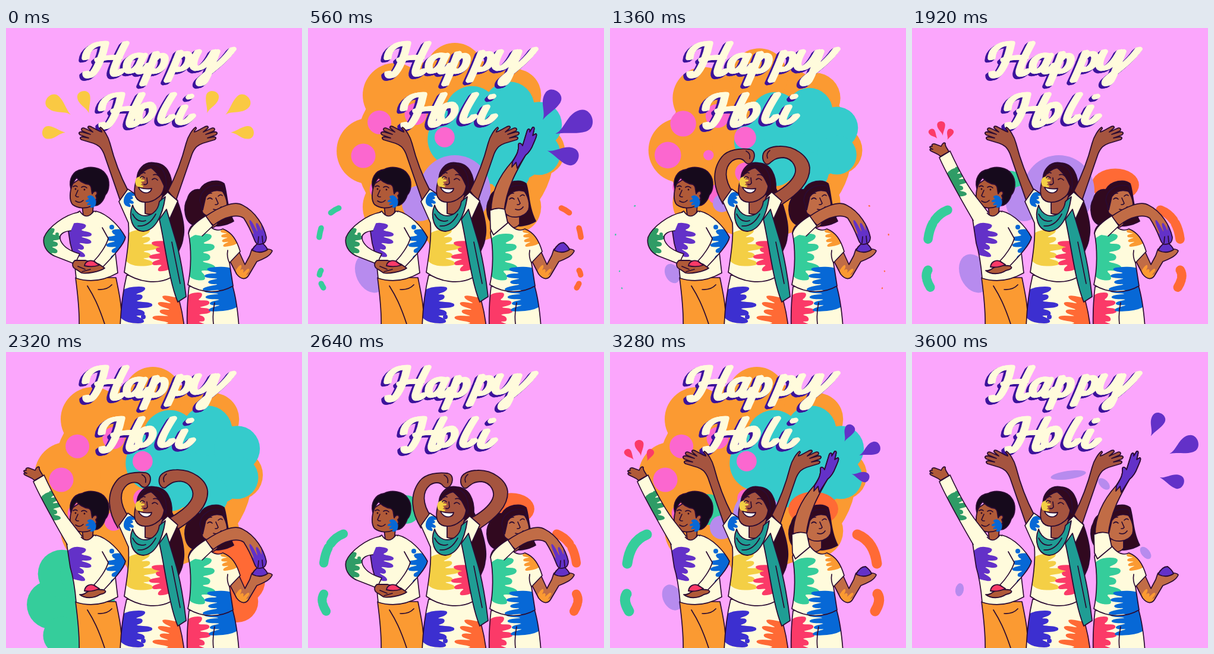
An HTML page for the animation above (3.68 s loop, 498 px wide and 498 px high).

```html
<!DOCTYPE html>
<html lang="en">
<head>
<meta charset="utf-8">
<title>Happy Holi</title>
<style>
html, body { margin: 0; width: 100%; height: 100%; overflow: hidden; background: #fba6fc; }
svg { display: block; width: 100vw; height: 100vh; }
.o { stroke: #2b0b32; stroke-width: 1.8; stroke-linejoin: round; stroke-linecap: round; }
.l { fill: none; stroke: #2b0b32; stroke-width: 1.7; stroke-linecap: round; stroke-linejoin: round; }
.t { fill: none; stroke-width: 7.5; stroke-linecap: round; stroke-linejoin: round; }
</style>
</head>
<body>
<svg id="stage" viewBox="0 0 498 498" role="img" aria-label="Happy Holi"></svg>
<script>
const LOOP = 3680, STEP = 80;
const C = {
  cream: '#fffbdc', hair: '#31091f', black: '#160a1c', skin: '#a5543f', brown: '#b05a38', tan: '#c16c46',
  orange: '#fb9a32', pink: '#fb67cf', teal: '#35cbcc', green: '#35cd9b', fern: '#2f9c66', red: '#ff6a35',
  lilac: '#b78bee', yellow: '#fac943', purple: '#6331c8', rose: '#fb3a68', blue: '#0768d6',
  indigo: '#3c2fd0', scarf: '#1f9d94', ink: '#3c149b', gold: '#f4cf45'
};

// ---------- helpers ----------
const mix = (a, b, k) => a + (b - a) * k;
const unit = v => Math.max(0, Math.min(1, v));
const easeOut = k => 1 - (1 - k) ** 2;
const range = n => [...Array(n).keys()];
const shape = (d, fill) => `<path class="o" d="${d}" fill="${fill}"/>`;
const line = d => `<path class="l" d="${d}"/>`;
const ball = (x, y, r, fill, ry = r, turn = 0) =>
  `<ellipse cx="${x}" cy="${y}" rx="${r}" ry="${ry}" fill="${fill}" transform="rotate(${turn} ${x} ${y})"/>`;
const mirror = s => `<g transform="translate(478 0) scale(-1 1)">${s}</g>`;

// Closed curve through the middles of a polygon's sides.
function soft(pts) {
  const mid = (p, q) => [(p[0] + q[0]) / 2, (p[1] + q[1]) / 2].map(v => v.toFixed(1));
  const steps = pts.map((p, i) => `Q${p.map(v => v.toFixed(1))} ${mid(p, pts[(i + 1) % pts.length])}`);
  return 'M' + mid(pts[pts.length - 1], pts[0]) + steps.join('') + 'Z';
}

// Paint mark: fingers of uneven length fanning out from a base line.
function smear(x, y, len, wide, turn, fill, n = 5) {
  const pts = [[0, -wide / 2]];
  range(n).forEach(i => {
    const c = (i + .5) / n - .5, h = .36 * wide / n;
    const tip = len * (.72 + .42 * Math.abs(Math.sin(i * 1.9 + len))) * (1 - 1.2 * c * c);
    pts.push([tip, c * wide * 1.2 - h], [tip, c * wide * 1.2 + h]);
    if (i < n - 1) pts.push([len * .45, (c + .5 / n) * wide]);
  });
  pts.push([0, wide / 2], [-len * .3, 0]);
  return `<path d="${soft(pts)}" fill="${fill}" transform="translate(${x} ${y}) rotate(${turn})"/>`;
}

let clips = 0;
function cloth(d, fill, paint = '') {
  const id = 'clip' + clips++;
  return `<clipPath id="${id}"><path d="${d}"/></clipPath><path d="${d}" fill="${fill}"/>
    <g clip-path="url(#${id})">${paint}</g>${line(d)}`;
}

// ---------- lettering: thin strokes swept along a broad nib ----------
const bigH = 'M134 50C135 34 150 25 167 26C163 46 155 65 148 74C142 83 135 82 135 76' +
  'M201 26C191 45 183 62 181 72C180 80 187 80 194 72M155 53Q174 48 190 50';
const happy = 'M229 47C217 42 203 52 203 65C203 77 215 75 225 61M232 46C226 58 221 67 223 72C226 77 233 72 240 62' +
  'M252 43C246 60 238 78 231 94M247 56C255 43 269 43 267 55C265 68 253 77 244 71' +
  'M292 41C286 57 279 73 272 88M287 53C295 40 310 40 308 52C306 65 294 74 284 68' +
  'M323 40C315 54 312 66 320 68C331 69 343 54 350 40' +
  'M354 40C347 58 341 78 334 89C328 97 322 94 328 86C339 75 364 60 381 36';
const holi = 'M243 129C230 124 219 144 224 155C231 163 248 148 247 136C246 130 242 128 238 131' +
  'M281 112C270 129 262 144 261 152C261 160 270 159 279 149' +
  'M300 133C294 144 288 154 292 158C297 162 306 157 313 148M309 116L310 115';
const nib = [-3, -1, 1, 3].map(x => `<use href="#word" x="${x}" y="${-x * .2}"/>`).join('');
const title = `<defs><g id="word"><path d="${bigH}${happy}${holi}"/><path d="${bigH}" transform="translate(27 86)"/></g></defs>
  <g class="t">${[5, 4, 3, 2, 1].map(k => `<g stroke="${C.ink}" transform="translate(${-k} ${k * .8})">${nib}</g>`).join('')}
  <g stroke="${C.cream}">${nib}</g></g>`;

// ---------- people ----------
const man = `
  ${cloth('M117 420C121 450 124 476 123 504H195C196 470 190 445 185 420Z', C.orange)}
  ${line('M137 434C147 450 155 465 166 498M155 440Q170 441 178 432')}
  ${shape('M128 298L130 316Q139 325 146 309L147 296Z', C.brown)}
  ${cloth('M124 308Q135 325 148 308C162 313 172 318 178 328L188 412Q153 432 118 421C116 397 112 375 108 362L102 322Z', C.cream,
    smear(104, 352, 38, 52, 12, C.purple))}
  ${shape('M112 262C107 275 106 290 112 297C121 304 134 304 143 300L155 284C156 268 148 252 130 250Z', C.brown)}
  ${shape('M109 270C105 254 113 240 128 238C141 231 160 235 167 245C176 256 174 274 167 281C163 294 154 301 147 298C153 292 154 288 151 282C157 277 150 270 145 279C143 272 145 266 139 263C130 262 122 256 119 252C114 256 112 263 109 270Z', C.black)}
  ${smear(148, 290, 13, 20, 160, C.blue, 4)}
  ${line('M113 267q4-3 7 0M127 268q5-3 9 1M121 273l-4 9q2 3 5 2M117 291q7 5 13-1')}
  ${ball(117, 271, 1.4, C.hair)}${ball(132, 272, 1.4, C.hair)}
  ${cloth('M151 308C172 313 192 335 201 352C199 364 181 383 162 403L148 392C157 383 169 366 172 354L162 336', C.cream,
    smear(203, 361, 33, 46, 172, C.blue) + ball(178, 335, 4, C.blue))}
  <g id="manDown">
    ${cloth('M122 310C99 314 71 335 64 352C61 365 68 377 80 383L116 397L124 380C110 376 97 369 92 358C87 347 98 342 109 341', C.cream,
      smear(64, 362, 25, 50, 5, C.fern) + ball(86, 347, 3, C.fern))}
    ${shape('M116 391C110 396 111 403 118 406L127 412C135 414 158 410 166 404L156 397L134 391Z', C.brown)}
    ${shape('M132 400C133 393 140 390 147 392L157 399Q145 403 132 400Z', C.rose)}
    ${line('M121 401l12 5M128 410l14-4')}
  </g>
  <g id="manUp">
    ${cloth('M103 324C84 291 59 248 46 218L64 207C75 231 92 265 110 287L128 310', C.cream,
      smear(63, 262, 29, 46, -10, C.fern) + ball(75, 236, 2.5, C.fern))}
    ${shape('M48 216C43 211 39 211 32 207C28 204 31 203 35 204C28 201 29 199 34 199C32 195 36 194 41 196L49 199C51 194 54 192 56 194C55 199 60 203 62 208Z', C.brown)}
    ${shape('M124 408C132 410 136 402 146 399L163 400C171 402 168 406 158 408C148 415 132 415 124 408Z', C.brown)}
    ${shape('M132 402C133 393 141 390 147 392L157 398Q145 404 132 402Z', C.rose)}
  </g>`;

const armUp = shape('M192 290L165 212C160 200 155 197 147 194L127 188C123 185 125 183 129 183L139 185L125 180C121 177 123 174 128 175L142 179L128 173C125 169 129 167 133 169L146 175L138 168C137 164 142 165 145 167C152 171 157 174 161 175C162 171 155 170 159 167C164 170 172 182 175 194C183 225 193 250 205 273', C.skin);
const woman = `
  ${shape('M221 262C217 237 234 224 250 227C272 228 280 250 279 270C292 295 303 332 298 352C297 367 291 371 288 382L262 330Z', C.hair)}
  <g id="midUp">${armUp}${mirror(armUp)}</g>
  <g id="midHeart">
    ${shape('M190 296C174 270 170 240 188 217C198 204 220 202 235 204C243 206 244 213 242 220C238 230 231 230 227 225C222 218 212 219 205 224C192 235 192 255 207 277', C.skin)}
    ${shape('M289 297C315 280 337 260 336 235C334 215 310 198 285 199C272 199 258 204 257 215C256 225 263 232 268 228C275 222 280 218 292 218C308 220 316 236 310 248C304 260 288 272 273 280', C.skin)}
    ${line('M229 207q8 4 6 13M269 206q-7 5-4 13')}
  </g>
  ${cloth('M203 416C196 445 193 475 192 504H300C297 475 288 440 277 418Z', C.cream,
    smear(195, 466, 45, 58, 0, C.indigo) + smear(302, 484, 50, 52, 190, C.red) + ball(231, 486, 4, C.indigo))}
  ${cloth('M205 271L190 292L206 328C208 355 203 385 199 411C222 428 255 432 277 420L274 350L272 328L289 291L272 276L248 300Z', C.cream,
    smear(204, 372, 48, 58, -5, C.gold) + smear(279, 382, 35, 48, 175, C.rose) + smear(202, 286, 14, 24, 20, C.blue, 4))}
  ${shape('M234 288L234 312Q250 318 258 300L264 280Z', C.skin)}
  ${shape('M224 245C217 258 214 275 218 284C224 296 243 296 256 285C264 280 267 268 266 260C264 244 255 237 245 235Q231 235 224 245Z', C.skin)}
  ${shape('M221 252C222 236 235 228 250 230C264 233 272 248 269 272C264 263 261 248 244 235Q231 238 221 252Z', C.hair)}
  ${smear(220, 259, 12, 17, 0, C.gold, 4)}
  ${shape('M223 268Q234 272 245 270C244 277 236 279 230 276Q225 273 223 268Z', '#fff')}
  ${line('M226 252q3-4 7 0M246 255q5-4 9 1M237 252l1 9q-3 4-6 2M228 245q3-3 6-1M248 247q5-2 9 2')}
  ${shape('M258 322C268 365 274 425 289 461L303 452C300 425 293 380 284 352L270 305Z', C.scarf)}
  ${shape('M213 298C205 318 212 341 231 342C250 341 263 318 268 284Q262 288 258 292C256 309 242 319 228 315Q217 311 213 298Z', C.scarf)}
  ${line('M213 313q8 16 22 11M222 333q18 2 30-20M279 360q8 40 14 70')}`;

const hand = 'C352 212 355 206 354 196C355 192 359 194 361 198L369 172C372 168 374 171 373 175L378 167C381 166 381 169 380 173L378 181L383 178C387 178 382 188 379 195C375 206 371 210 366 214';
const girl = `
  ${cloth('M308 435C305 460 304 480 305 504H392C390 475 386 450 381 433Z', C.cream,
    smear(304, 476, 38, 58, 0, C.rose) + smear(388, 451, 52, 46, 178, C.blue))}
  ${line('M351 462Q347 480 349 498')}
  ${shape('M326 272C335 256 358 254 367 262C372 275 371 302 383 325C370 333 352 335 340 331L318 332C299 328 298 300 305 288C308 276 317 270 326 272Z', C.hair)}
  ${cloth('M375 389L388 414C396 424 404 424 409 415L422 393C431 389 444 385 448 375C445 370 430 372 420 374C418 370 414 370 413 374L410 383L402 398L392 376Z', C.tan,
    smear(392, 420, 20, 24, -50, C.orange, 4))}
  ${shape('M334 308L334 330Q346 342 356 330L356 312Z', C.tan)}
  ${cloth('M330 322C316 328 308 334 307 345C312 370 312 405 306 432C330 447 360 447 382 434L376 395L394 376C388 356 380 344 365 338Q349 346 333 322Z', C.cream,
    smear(307, 384, 43, 74, 3, C.green) + smear(384, 424, 50, 46, 175, C.blue) + smear(388, 350, 27, 28, 170, C.orange, 4))}
  ${line('M376 395Q371 386 373 374')}
  ${shape('M335 277C330 290 327 300 331 311C341 322 364 320 371 306C375 291 366 275 360 270C350 265 339 270 335 277Z', C.tan)}
  ${shape('M326 290C327 272 345 261 365 266L368 276Q347 268 336 284L331 306Z', C.hair)}
  ${line('M339 288q4-4 8 0M357 283q4-4 7-1M353 286l4 9q-2 3-5 2M349 305q8 3 13-4M338 281q4-4 8-3')}
  ${shape('M414 374C418 366 424 361 430 361Q438 367 440 373Q428 381 414 374Z', C.purple)}
  <g id="girlDown">
    ${cloth('M334 318C360 300 385 290 398 298C420 309 434 333 438 352C438 362 432 364 424 364C417 362 418 348 400 320C390 313 369 316 349 332Z', C.tan,
      smear(430, 366, 42, 34, 245, C.purple))}
    ${line('M425 351l-1 11M431 350l1 11')}
    ${cloth('M307 346C309 335 323 324 336 316L348 333L330 350', C.cream)}
  </g>
  <g id="girlUp">
    ${shape(`M308 308C308 272 325 245 344 224${hand}C350 242 334 270 330 308`, C.tan)}
    ${shape(`M344 225${hand}L352 236L350 226L343 234Z`, C.purple)}
    ${cloth('M306 307Q318 301 331 305L336 328L312 348L307 338Z', C.cream)}
  </g>`;

document.getElementById('stage').innerHTML = `
  <rect width="498" height="498" fill="#fba6fc"/><g id="clouds"></g>
  ${title}<g id="bursts"></g>${man}${girl}${woman}`;

// ---------- clouds: a ring of puffs around a core ----------
// Each end of the growth gives x, y, ring rx, ring ry, puff radius, core share.
function cloud(fill, n, from, to, grow, size) {
  const [x, y, rx, ry, r, core] = from.map((v, i) => mix(v, to[i], grow));
  const ring = range(n).map(i => {
    const a = Math.PI + i * 2 * Math.PI / n;
    const lobe = r * (1 - .14 * Math.cos(a - Math.PI / 2 * i));
    return ball(x + rx * Math.cos(a), y + ry * Math.sin(a), lobe * size, fill);
  });
  return ball(x, y, (rx + r / 2) * core * size, fill, (ry + r / 2) * core * size) + ring.join('');
}

function bigClouds(t) {
  const u = (t + 680) % 880;
  const grow = easeOut(unit((u - 120) / 240));
  const size = unit(u / 120) * unit((680 - u) / 160);
  if (!size) return '';
  return cloud(C.orange, 8, [285, 195, 48, 52, 35, 1], [247, 207, 143, 133, 49, 1], grow, size) +
    cloud(C.teal, 7, [306, 220, 22, 22, 13, .6], [322, 187, 74, 56, 41, 1], grow, size) +
    cloud(C.pink, 7, [172, 205, 40, 34, 32, 1], [165, 215, 72, 72, 18, 0], grow, size);
}

// Low side clouds swell, then burst into crescents.
function sideClouds(t) {
  return range(5).map(i => {
    const u = t - 336 - 716 * i;
    if (u < -320 || u >= 320) return '';
    if (u < 0) {
      const k = unit((u + 320) / 160), size = unit(k * 2), grow = easeOut(unit(k * 2 - 1));
      return cloud(C.green, 6, [120, 445, 25, 35, 24, 1], [112, 425, 36, 60, 36, 1], grow, size) +
        cloud(C.red, 6, [350, 405, 22, 32, 32, 1], [380, 385, 18, 40, 38, 1], grow, size);
    }
    const p = u / 320, q = unit((p - .42) / .55), rest = unit(1.9 - 2 * p);
    const crescent = (d, dx, dy) => `<path d="${d}" pathLength="100" fill="none" stroke-linecap="round"
      stroke-width="${mix(17, 2, q)}" stroke-dasharray="${mix(50, 1, q)} ${98 * q}" transform="translate(${dx * q} ${dy * q})"/>`;
    const pair = crescent('M62 307Q34 318 29 356', -20, -8) + crescent('M28 407Q21 418 32 436', -12, 2);
    return `<g stroke="${C.green}">${pair}</g><g stroke="${C.red}">${mirror(pair)}</g>` +
      (p < .6 ? ball(165, 265, 26 * rest, C.green) + ball(342, 264, 42 * rest, C.red, 29 * rest) : '');
  }).join('');
}

function lilac(t) {
  const puffs = [[400, 1480], [1760, 2200], [3040, 3440]].map(([a, b]) => {
    const k = unit((t - a) / 160) * unit((b - t) / 240);
    return k ? ball(247, 274, 60 * k, C.lilac) + ball(188, 295, 30 * k, C.lilac) +
      ball(105, 413, 24 * k, C.lilac, 34 * k, -25) : '';
  });
  const z = 1.3 - (t - 3440) / 530;
  const shards = t < 3440 ? [] : [[263, 207, 30, -8], [323, 222, 12, 45], [80, 400, 11, 100], [393, 338, 12, 50]]
    .map(([x, y, r, turn]) => ball(x, y, r * z, C.lilac, 7 * z, turn));
  return puffs.concat(shards).join('');
}

// ---------- thrown powder: three drops fanning from a hand ----------
function fan(t, starts, fill, x, y, aim, step, near, far, size) {
  return starts.map(a => {
    const p = (t - a) / 480;
    if (p < 0 || p >= 1) return '';
    const z = size * (p < .35 ? mix(.3, 1, p / .35) : unit((1.25 - p) / .58));
    const reach = mix(near, far, easeOut(p));
    return [-1, 0, 1].map(i => {
      const w = z * (i ? .8 : 1);
      return `<path fill="${fill}" transform="translate(${x} ${y}) rotate(${aim + i * step}) translate(${reach * (i ? .9 : 1.1)} 0) scale(${w})"
        d="M-1.5 .3C-.8 .2 -.4 -.75 .5 -.75C1.4 -.75 1.4 .75 .5 .75C-.2 .75 -.7 .4 -1.5 .3Z"/>`;
    }).join('');
  }).join('');
}

function powder(t) {
  const gold = fan(t, [-312, 1440, 2800], C.yellow, 142, 187, 225, 36, 30, 78, 18);
  return gold + mirror(gold) +
    fan(t, [368, 3216], C.purple, 368, 185, 343, 40, 60, 88, 25) +
    fan(t, [1776, 3040], C.rose, 49, 202, 270, 30, 16, 46, 10);
}

// ---------- poses ----------
const $ = id => document.getElementById(id);
const during = (t, spans) => spans.some(([a, b]) => t >= a && t < b);
function pose(on, up, down) {
  $(up).setAttribute('display', on ? 'inline' : 'none');
  $(down).setAttribute('display', on ? 'none' : 'inline');
}

function draw(t) {
  $('clouds').innerHTML = bigClouds(t) + sideClouds(t) + lilac(t);
  $('bursts').innerHTML = powder(t);
  pose(during(t, [[960, 1440], [2240, 2800]]), 'midHeart', 'midUp');
  pose(during(t, [[1776, 2640], [3040, LOOP]]), 'manUp', 'manDown');
  pose(during(t, [[368, 1120], [3216, LOOP]]), 'girlUp', 'girlDown');

  // The raised arms overshoot a little after each change.
  const since = Math.min(...[-400, 960, 1440, 2240, 2800].map(v => t < v ? LOOP : t - v));
  const k = 1 + .05 * unit(1 - since / 240);
  for (const id of ['midUp', 'midHeart'])
    $(id).setAttribute('transform', `translate(239 285) scale(${k} ${mix(1, k, .3)}) translate(-239 -285)`);
}

let last = -1;
const begin = performance.now();
function tick() {
  const t = Math.floor((performance.now() - begin) % LOOP / STEP) * STEP;
  if (t !== last) draw(last = t);
  requestAnimationFrame(tick);
}
tick();
</script>
</body>
</html>
```
